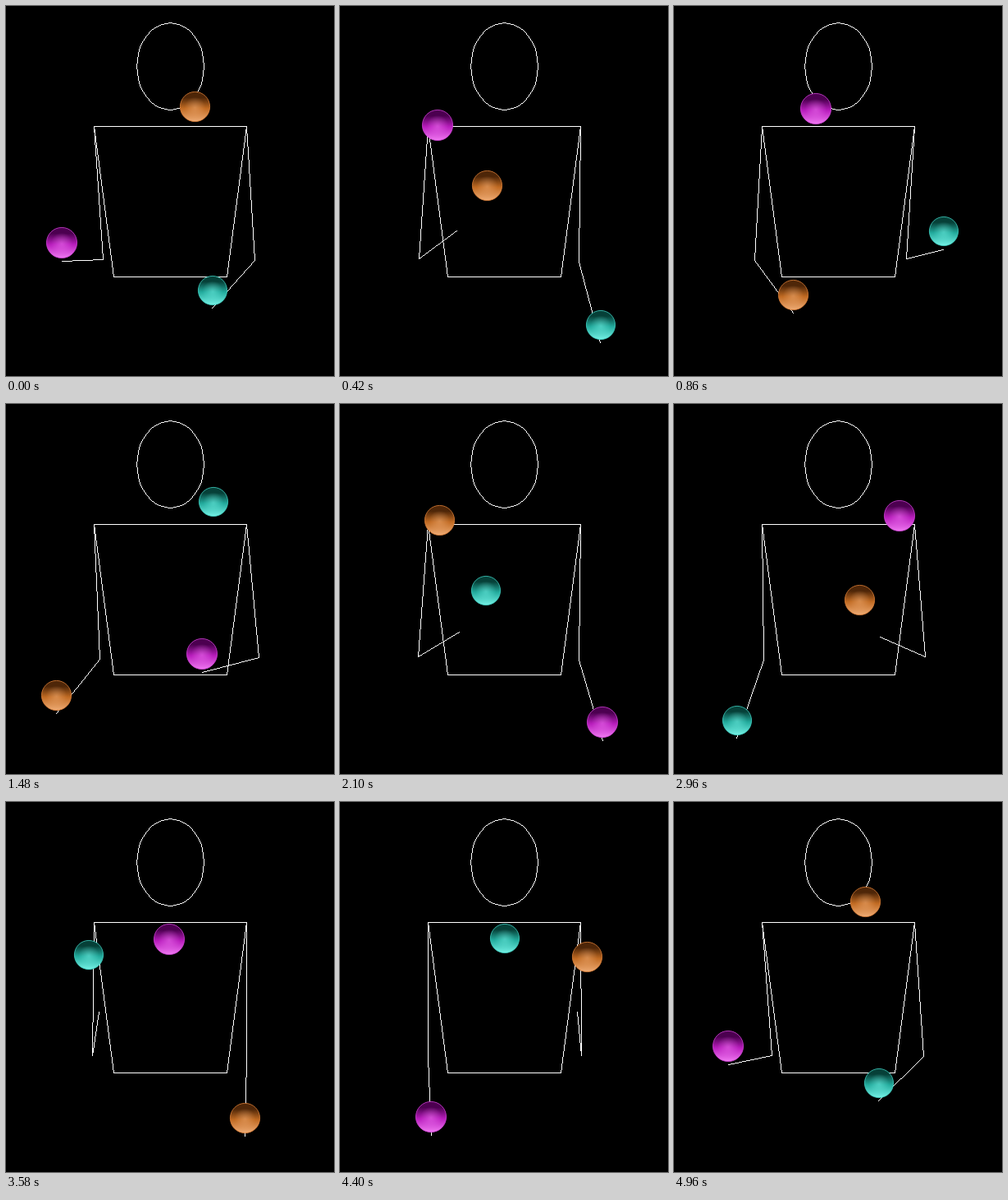
An HTML page with a canvas for the animation above (4.98 s loop, 400 by 450 pixels).

```html
<!DOCTYPE html>
<html lang="en">
<head>
<meta charset="utf-8">
<title>Reverse cascade</title>
<style>
  html, body { margin: 0; width: 100%; height: 100%; overflow: hidden; background: #000; }
  canvas { display: block; }
</style>
</head>
<body>
<canvas id="stage" width="400" height="450"></canvas>
<script>
const ctx = document.getElementById('stage').getContext('2d');

// Timing in ms: a hand throws every two beats and holds a ball for 1.3 beats
const BEAT = 830, CYCLE = 2 * BEAT, LOOP = 6 * BEAT, STEP = 20;
const HOLD = 1.3 * BEAT, EMPTY = CYCLE - HOLD, FLIGHT = 3 * BEAT - HOLD;

// Geometry is worked out for the right side and mirrored for the left
const MIRROR = 400.2;
const THROW = { x: 331.9, y: 309.5, vx: -0.1219, vy: -0.484 };
const CATCH = { x: 240.6, y: 309.5, vx: -0.048, vy: 0.245 };
const SHOULDER = { x: 293, y: 146 };
const UPPER = 165.6, LOWER = 161.6;

const balls = [
  { r: 19, dx: 19, start: 3 * BEAT, dark: '#4c0050', mid: '#b81cbc', light: '#f27cf4', rim: '#d040d6' },
  { r: 18.5, dx: 18.5, start: 5 * BEAT, dark: '#4e2608', mid: '#c06a22', light: '#f0ae78', rim: '#e08038' },
  { r: 18, dx: 17.4, start: BEAT, dark: '#064038', mid: '#22aa9c', light: '#78f4e8', rim: '#40d4c6' }
];

const mod = (a, n) => ((a % n) + n) % n;
const mirror = (p, left) => left ? { x: MIRROR - p.x, y: p.y } : p;

function hermite(a, va, b, vb, s, d) {
  const r = 1 - s;
  return a + (b - a) * s * s * (3 - 2 * s) + d * s * r * (va * r - vb * s);
}

function glide(a, b, s, d) {
  return {
    x: hermite(a.x, a.vx, b.x, b.vx, s, d),
    y: hermite(a.y, a.vy, b.y, b.vy, s, d)
  };
}

function hand(t, left) {
  const u = mod(left ? t : t - BEAT, CYCLE);
  return u < EMPTY
    ? glide(THROW, CATCH, u / EMPTY, EMPTY)
    : glide(CATCH, THROW, (u - EMPTY) / HOLD, HOLD);
}

// The elbow hangs in the vertical plane through shoulder and hand
function elbow(h) {
  const dx = h.x - SHOULDER.x, dy = h.y - SHOULDER.y;
  const reach = Math.hypot(dx, 117 + dx / 16);
  const d = Math.hypot(reach, dy);
  const bend = Math.acos(Math.min(1, (UPPER ** 2 + d * d - LOWER ** 2) / (2 * UPPER * d)));
  const angle = Math.atan2(reach, dy) - bend;
  return {
    x: SHOULDER.x + UPPER * Math.sin(angle) * dx / reach,
    y: SHOULDER.y + UPPER * Math.cos(angle)
  };
}

function ballAt(ball, t) {
  const p = mod(t - ball.start, LOOP);
  const left = p >= 3 * BEAT;
  const age = p % (3 * BEAT);
  if (age >= FLIGHT) return mirror(hand(t, !left), !left);
  return mirror({
    x: THROW.x + THROW.vx * age,
    y: THROW.y + THROW.vy * age * (1 - age / FLIGHT)
  }, left);
}

// Hard-edged line, one pixel wide
function line(a, b) {
  const x0 = Math.round(a.x), y0 = Math.round(a.y);
  const dx = Math.round(b.x) - x0, dy = Math.round(b.y) - y0;
  const n = Math.max(Math.abs(dx), Math.abs(dy), 1);
  for (let i = 0; i <= n; i++) {
    ctx.fillRect(Math.round(x0 + dx * i / n), Math.round(y0 + dy * i / n), 1, 1);
  }
}

function path(points, closed) {
  points.forEach((p, i) => {
    if (i) line(points[i - 1], p);
  });
  if (closed) line(points[points.length - 1], points[0]);
}

const head = Array.from({ length: 40 }, (_, i) => {
  const a = i * Math.PI / 20;
  return { x: 200 + 41 * Math.cos(a), y: 73 + 53 * Math.sin(a) };
});
const torso = [[107, 146], [293, 146], [269, 329], [131, 329]].map(([x, y]) => ({ x, y }));

function drawBall(ball, t) {
  const { r } = ball, p = ballAt(ball, t);
  ctx.save();
  ctx.translate(Math.round(p.x - ball.dx) + r, Math.round(p.y - 2 * r - 3) + r);

  const shade = ctx.createLinearGradient(0, -r, 0, r);
  shade.addColorStop(0, ball.dark);
  shade.addColorStop(0.2, ball.dark);
  shade.addColorStop(0.55, ball.mid);
  shade.addColorStop(1, ball.light);
  ctx.beginPath();
  ctx.arc(0, 0, r - 0.4, 0, 2 * Math.PI);
  ctx.fillStyle = shade;
  ctx.fill();

  const glow = ctx.createRadialGradient(0, 1, 0, 0, 1, r * 0.7);
  glow.addColorStop(0, ball.light + '80');
  glow.addColorStop(1, ball.light + '00');
  ctx.fillStyle = glow;
  ctx.fill();

  ctx.strokeStyle = ball.rim;
  ctx.lineWidth = 0.8;
  ctx.stroke();
  ctx.restore();
}

function draw(t) {
  ctx.fillStyle = '#000';
  ctx.fillRect(0, 0, 400, 450);
  ctx.fillStyle = '#fff';
  path(head, true);
  path(torso, true);
  for (const left of [false, true]) {
    const h = hand(t, left);
    path([SHOULDER, elbow(h), h].map(p => mirror(p, left)));
  }
  balls.forEach(ball => drawBall(ball, t));
}

const begin = performance.now();
function tick() {
  const t = (performance.now() - begin) % LOOP;
  draw(Math.floor(t / STEP) * STEP);
  requestAnimationFrame(tick);
}
tick();
</script>
</body>
</html>
```
